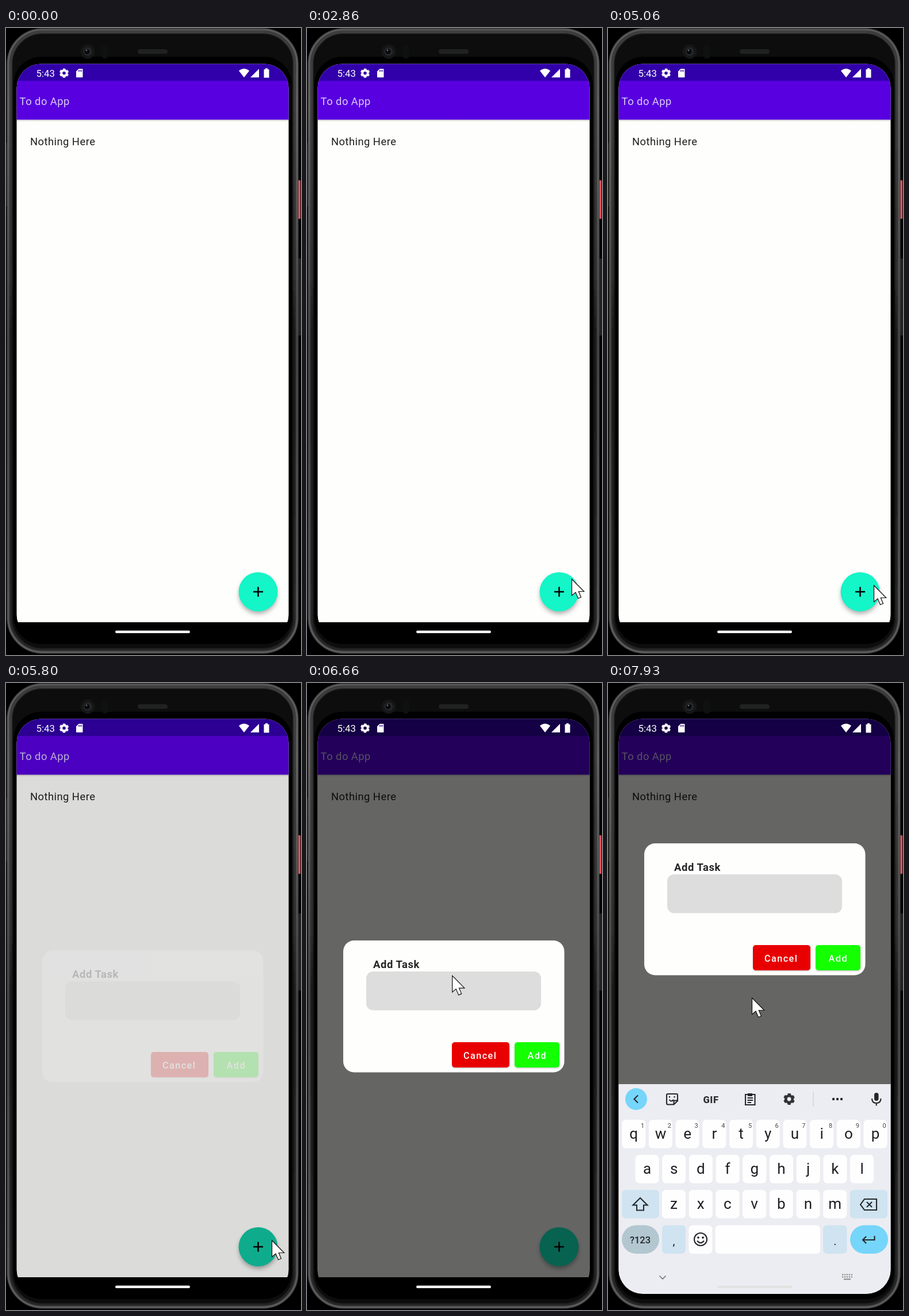
Animation, 513 px wide and 1091 px high, one loop 8 s. Source, as an HTML page:

```html
<!DOCTYPE html>
<html lang="en">
<head>
<meta charset="utf-8">
<title>To do App</title>
<style>
  html, body { margin: 0; width: 100%; height: 100%; overflow: hidden; background: #000; }
  svg { display: block; width: 513px; height: 1091px; font-family: Roboto, sans-serif; }
  .body { font-size: 18.4px; letter-spacing: .45px; }
  .btn { font-size: 16.1px; font-weight: 500; letter-spacing: 1.5px; fill: #fff; }
  .key { font-size: 26px; text-anchor: middle; fill: #1c1d20; }
  .hint { font-size: 11px; text-anchor: middle; fill: #45474b; }
  .line { fill: none; stroke: #25272a; stroke-width: 2.1; }
</style>
</head>
<body>
<svg viewBox="0 0 513 1091">
  <defs>
    <clipPath id="screen"><rect x="18.5" y="62.5" width="473" height="1000.5" rx="42"/></clipPath>
    <clipPath id="fabClip"><circle cx="438.5" cy="981" r="34"/></clipPath>
    <linearGradient id="edge" x2="0" y2="1">
      <stop stop-color="#666"/><stop offset=".12" stop-color="#787878"/>
      <stop offset=".5" stop-color="#505050"/><stop offset="1" stop-color="#6c6c6c"/>
    </linearGradient>
    <linearGradient id="gloss" x2="0" y2="1">
      <stop stop-color="#484848"/><stop offset=".4" stop-color="#343434"/>
      <stop offset=".5" stop-color="#1a1a1a"/><stop offset="1" stop-color="#2c2c2c"/>
    </linearGradient>
    <linearGradient id="barShadow" x2="0" y2="1">
      <stop stop-opacity=".22"/><stop offset="1" stop-opacity="0"/>
    </linearGradient>
    <filter id="blur" x="-30%" y="-30%" width="160%" height="160%"><feGaussianBlur stdDeviation="4.5"/></filter>
    <filter id="soft" x="-10%" y="-20%" width="120%" height="150%"><feGaussianBlur stdDeviation=".9"/></filter>
    <g id="gear" fill="none" stroke="currentColor">
      <circle r="4.7" stroke-width="3.8"/>
      <circle r="6.9" stroke-width="2.4" stroke-dasharray="4.4 2.825" stroke-dashoffset="2.2" transform="rotate(30)"/>
    </g>
  </defs>

  <!-- phone -->
  <rect width="513" height="1091"/>
  <rect x="507" y="265" width="5" height="67" rx="1" fill="#e0525c"/>
  <rect x="508" y="401" width="5" height="134" rx="1" fill="#202222"/>
  <rect x="0" y="200" width="3" height="110" fill="#1a1a1a"/>
  <rect x="1.5" y=".5" width="507" height="1088" rx="62" fill="#2c2c2c"/>
  <g filter="url(#soft)">
    <rect x="4" y="3" width="502" height="1083" rx="59" fill="#0d0d0d" stroke="url(#edge)" stroke-width="3"/>
    <rect x="8.5" y="7.5" width="493" height="1074" rx="55" fill="#080909" stroke="url(#gloss)" stroke-width="3"/>
  </g>
  <rect x="13" y="50" width="484" height="1022" rx="48"/>
  <circle cx="142" cy="41" r="12.5" fill="#151617"/>
  <circle cx="142" cy="41" r="7.5" fill="#25272a"/>
  <circle cx="141" cy="41" r="4.5" fill="#08090b"/>
  <circle cx="140" cy="39" r="1.4" fill="#666b70"/>
  <rect x="166" y="29" width="12" height="24" rx="5" fill="#0f1010"/>
  <rect x="229" y="37" width="52" height="8" rx="4" fill="#202121"/>

  <g clip-path="url(#screen)">
    <!-- app -->
    <rect x="18" y="62" width="474" height="972" fill="#fefefc"/>
    <rect x="18" y="159" width="474" height="4" fill="url(#barShadow)"/>
    <rect x="18" y="92" width="474" height="67.5" fill="#5800e0"/>
    <rect x="18" y="62" width="474" height="30" fill="#3200aa"/>
    <text class="body" x="23.6" y="133.5" fill="#dccbf6">To do App</text>
    <text class="body" x="42" y="204" fill="#202020">Nothing Here</text>
    <circle cx="438.5" cy="986" r="33" opacity=".34" filter="url(#blur)"/>
    <circle cx="438.5" cy="981" r="34" fill="#14f5c8"/>
    <g clip-path="url(#fabClip)"><circle id="ripple" cx="462" cy="970"/></g>
    <path d="M430 981H447M438.5 972.5V989.5" stroke="#000" stroke-width="2.6"/>
    <rect id="dim" x="18" y="62" width="474" height="972"/>

    <!-- status bar -->
    <g fill="#fff" color="#fff">
      <text x="52.6" y="84.5" font-size="16.8">5:43</text>
      <use href="#gear" x="101" y="78.5"/>
      <path d="M126.5 71H132.5Q133.5 71 133.5 72V85Q133.5 86 132.5 86H123Q122 86 122 85V75.5Z"/>
      <path d="M126.5 73V76M128.9 73V76M131.3 73V76" stroke="#3200aa" stroke-width="1.2"/>
      <path d="M405 74.5Q414 67 423 74.5L414 86Z"/>
      <path d="M425 86L440 71V86Z"/>
      <path d="M448.5 72H451V70H455V72H457.5V86.5H448.5Z"/>
    </g>

    <!-- dialog -->
    <g id="dialog">
      <rect x="63" y="448" width="384.5" height="229.5" rx="19" fill="#fefefc"/>
      <text class="body" x="115" y="495.5" font-weight="700" style="letter-spacing:.6px" fill="#242426">Add Task</text>
      <rect x="103" y="502" width="304" height="67.5" rx="12" fill="#ddd"/>
      <rect id="caret" x="123" y="520" width="2.4" height="24.5" fill="#6a10e8"/>
      <g opacity=".2" filter="url(#soft)">
        <rect x="252" y="626.5" width="100" height="44" rx="5"/>
        <rect x="361" y="626.5" width="78" height="44" rx="5"/>
      </g>
      <rect x="252" y="625" width="100" height="44" rx="5" fill="#e80000"/>
      <rect x="361" y="625" width="78" height="44" rx="5" fill="#14ff00"/>
      <text class="btn" x="272" y="654">Cancel</text>
      <text class="btn" x="383.6" y="654">Add</text>
    </g>

    <!-- keyboard -->
    <g id="keyboard">
      <rect x="18" y="698" width="474" height="366" fill="#ecedf2"/>
      <circle cx="49" cy="724" r="19" fill="#76d5fa"/>
      <path class="line" d="M52 717.5L45.5 724L52 730.5"/>
      <path class="line" d="M102 717Q102 715 104 715H119Q121 715 121 717V727L114.5 733.5H104Q102 733.5 102 731.5ZM121 726.5H116Q114.5 726.5 114.5 728V733M106.5 725Q110 730 114 725M107 719V721.5M115.5 719V721.5"/>
      <text x="179" y="730.5" font-size="16.5" font-weight="800" text-anchor="middle" letter-spacing=".6" fill="#303236">GIF</text>
      <path class="line" d="M239 716H255.5V734H239ZM242.5 722H252M242.5 726H252M242.5 730H249"/>
      <path d="M243 714H251V719H243Z" fill="#25272a"/>
      <use href="#gear" transform="translate(315 724) scale(1.22)" color="#303236"/>
      <path d="M357 711V737" stroke="#c9cbd0" stroke-width="1.2"/>
      <g fill="#25272a">
        <circle cx="392" cy="724" r="2.2"/><circle cx="399" cy="724" r="2.2"/><circle cx="406" cy="724" r="2.2"/>
        <rect x="463" y="713" width="7.5" height="14" rx="3.7"/>
      </g>
      <path class="line" d="M459 723Q459 731 466.7 731T474.5 723M466.7 731V735.5"/>
      <g id="keys"></g>
      <path class="line" d="M56 896L68.5 908.5H62V917.5H50V908.5H43.5Z"/>
      <path class="line" d="M446 898H467V917H446L439 907.5ZM450 903L459 912M459 903L450 912"/>
      <text x="56" y="974.5" font-size="16.5" font-weight="500" text-anchor="middle" fill="#25272a">?123</text>
      <text class="key" x="114.5" y="978" style="font-size:20px">,</text>
      <text class="key" x="395" y="978" style="font-size:20px">.</text>
      <circle class="line" cx="161" cy="968" r="11"/>
      <path class="line" d="M155 970.5Q161 978 167 970.5"/>
      <circle cx="157" cy="965" r="1.7"/><circle cx="165" cy="965" r="1.7"/>
      <path class="line" d="M463.5 962V969H443.5M449 963L443 969L449 975"/>
      <path class="line" d="M89.5 1031.5L95 1037L100.5 1031.5" style="stroke:#777;stroke-width:1.7"/>
      <path d="M407 1029.5H425M407 1033.5H425" stroke="#888" stroke-width="2.2" stroke-dasharray="2.4 1.5"/>
      <path d="M410 1037.5H422" stroke="#888" stroke-width="2"/>
    </g>
  </g>
  <rect id="pill" x="190" y="1048.5" width="130" height="4.5" rx="2.2"/>
  <path id="cursor" d="M.5 0V28.5L7 23L11.5 33.5L16.5 31.5L12.300 21.500H21.700Z" fill="#fff" stroke="#111" stroke-width="1.2"/>
</svg>
<script>
const LOOP = 8000, FPS = 15, PITCH = 46.7;
const el = id => document.getElementById(id);
const set = (id, attrs) => { for (const k in attrs) el(id).setAttribute(k, attrs[k]); };

// Keyboard keys
const parts = [];
const key = (x, y, w, fill = '#fefefe', rx = 7) =>
  parts.push(`<rect x="${x}" y="${y}" width="${w}" height="49.5" rx="${rx}" fill="${fill}"/>`);
const row = (letters, cx, y, hints = '') => [...letters].forEach((c, i) => {
  const x = cx + i * PITCH;
  key(x - 20.5, y, 41);
  parts.push(`<text class="key" x="${x}" y="${y + 33}">${c}</text>`);
  if (hints) parts.push(`<text class="hint" x="${x + 15.5}" y="${y + 13.5}">${hints[i]}</text>`);
});
row('qwertyuiop', 44.7, 760, '1234567890');
row('asdfghjkl', 68, 821);
row('zxcvbnm', 114.5, 882);
key(24, 882, 65, '#cfe3f0');
key(421, 882, 65, '#cfe3f0');
key(24, 943.5, 65, '#b2c7d0', 24.7);
key(94, 943.5, 41, '#cfe3f0');
key(140.5, 943.5, 41);
key(186.5, 943.5, 182.5);
key(374, 943.5, 41.5, '#cfe3f0');
key(421, 943.5, 66, '#76d5fa', 24.7);
el('keys').innerHTML = parts.join('');

const ramp = (t, start, length) => Math.min(1, Math.max(0, (t - start) / length));
const easeOut = x => 1 - (1 - x) ** 3;

// Pointer: time, x, y
const path = [
  [1000, 486, 905], [1333, 476, 935], [1600, 456, 972], [2133, 459, 958], [2333, 459, 958],
  [2400, 460, 959], [4260, 460, 959], [4533, 462, 970], [6267, 462, 970],
  [6667, 252, 509], [7067, 250, 548], [LOOP, 250, 548]
];
function pointer(t) {
  const i = Math.max(1, path.findIndex(p => p[0] > t));
  const [a, b] = [path[i - 1], path[i]];
  const u = ramp(t, a[0], b[0] - a[0]);
  return [1, 2].map(n => a[n] + (b[n] - a[n]) * u);
}

function draw(t) {
  const open = easeOut(ramp(t, 5790, 150));
  const lift = easeOut(ramp(t, 7543.5, 285));
  const slide = easeOut(ramp(t, 7529, 285));
  const grey = Math.round(242 - 16 * ramp(t, 7630, 200));

  set('dim', { opacity: .6 * ramp(t, 5750, 220) });
  set('ripple', {
    r: 70 * easeOut(ramp(t, 5390, 240)),
    opacity: .19 * ramp(t, 5390, 75) * (1 - ramp(t, 5867, 200))
  });
  set('dialog', { opacity: open, transform: `translate(0 ${21 * (1 - open) - 169 * lift})` });
  set('caret', { opacity: t >= 7330 && t < 7830 ? 1 : 0 });
  set('keyboard', { opacity: ramp(t, 7529, 140), transform: `translate(0 ${365 * (1 - slide)})` });
  set('pill', { fill: `rgb(${grey},${grey},${grey})` });
  set('cursor', { opacity: t < path[0][0] ? 0 : 1, transform: `translate(${pointer(t)})` });
}

function tick() {
  const t = performance.now() % LOOP;
  const step = Math.min(LOOP / 1000 * FPS - 1, Math.floor((t + 7) * FPS / 1000));
  draw(step * 1000 / FPS);
  requestAnimationFrame(tick);
}
tick();
</script>
</body>
</html>
```
